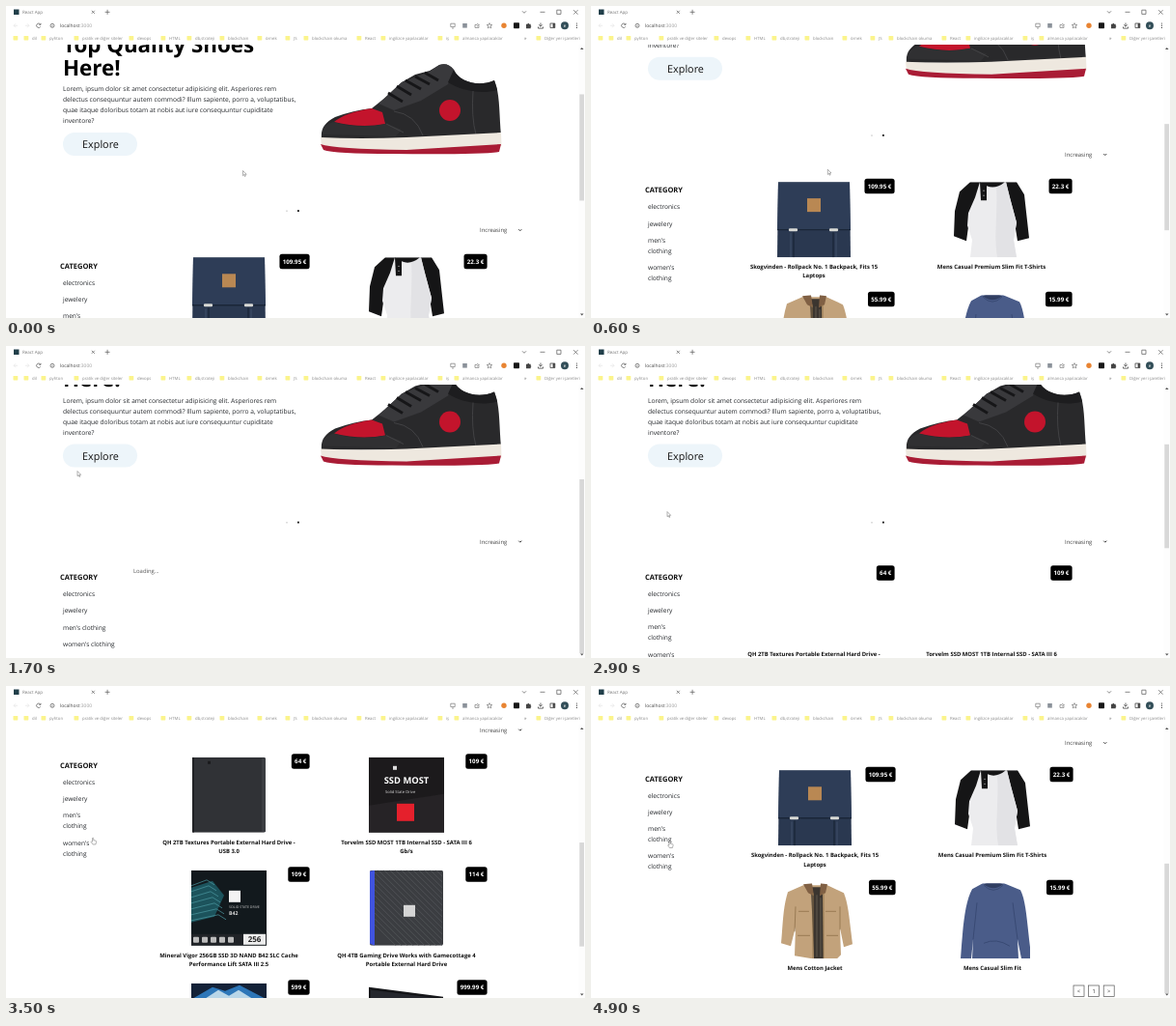
An HTML page that plays this animation: 600x323 px, repeating every 5 s.

```html
<!DOCTYPE html>
<html lang="en">
<head>
<meta charset="utf-8">
<title>Shop</title>
<style>
  html, body { margin: 0; height: 100%; overflow: hidden; background: #fff; }
  #stage { display: block; width: 100vw; height: 100vh; }
  text { font-family: "Open Sans", "Noto Sans", sans-serif; text-rendering: geometricPrecision; }
  .b { font-weight: 700; }
  .m { text-anchor: middle; }
  .line { fill: none; stroke: #555; stroke-width: .7; }
</style>
</head>
<body>
<svg id="stage" viewBox="0 0 600 323"></svg>
<script>
const text = (x, y, size, str, fill = '#25282c', cls = '') =>
  `<text x="${x}" y="${y}" font-size="${size}" fill="${fill}" class="${cls}">${str}</text>`;
const rect = (x, y, w, h, fill, rx = 0) =>
  `<rect x="${x}" y="${y}" width="${w}" height="${h}" fill="${fill}" rx="${rx}"/>`;
const path = (d, fill) => `<path d="${d}" fill="${fill}"/>`;
const line = (d, stroke = '#555', w = .7) =>
  `<path d="${d}" fill="none" stroke="${stroke}" stroke-width="${w}"/>`;
const dot = (x, y, r, fill) => `<circle cx="${x}" cy="${y}" r="${r}" fill="${fill}"/>`;
const range = n => [...Array(n).keys()];

// Product pictures, each drawn in a 78 x 78 box
const pics = {
  pack: path('M2 0H76L77 78H1Z', '#2a3850') + path('M2 0H76L77 49H1Z', '#2e3d57') +
    line('M1 49.5H77M18 52V78M59 52V78', '#1a2638', 1.4) + line('M15 53V78M62 53V78', '#46566f', .8) +
    rect(32, 17, 14, 14, '#b98853') + rect(13, 48, 9, 3, '#d8d9d5', 1) + rect(55, 48, 9, 3, '#d8d9d5', 1),
  tee: path('M17 0L6 10 1 30 0 56 13 61 17 32 23 16 28 0ZM53 0H65L73 13 78 58 66 61 62 36 57 16Z', '#151516') +
    path('M27 0L22 16 15 32 14 45 19 60 17 78H65L62 60 65 42 58 16 54 0Z', '#ececee') +
    path('M44 4C46 30 41 55 45 78H65L62 60 65 42 58 16 54 0Z', '#e2e2e5') +
    path('M27 0H53Q43 8 34 4V19H28Z', '#151516') + dot(31, 9, .6, '#ccc') + dot(31, 14, .6, '#ccc'),
  jacket: path('M27 2L11 9C6 25 6 40 4 62L14 65 19 45 18 75 36 78H62L66 74 65 46 69 66 78 63C75 40 74 22 69 10L52 2Z', '#c2a27b') +
    path('M35 4H47L48 78H38Z', '#3b352f') + path('M27 1L36 0 38 13 32 10ZM52 1L45 0 44 13 50 10Z', '#806044') +
    line('M19 24L18 50M65 24V48M22 29h11M50 29h11M21 54h13M51 54h12M37 10V78M48 10V78', '#957650', .9) +
    line('M41 12V76M45 15V76', '#756a5d', .7),
  sweater: path('M29 0L18 6C10 20 8 50 6 78H17L19 58 18 78H66L65 58 69 78H78V66C75 43 74 18 68 7L51 0Z', '#4a5c89') +
    path('M30 1Q40 9 50 1L47 0H33Z', '#303e62') +
    line('M19 58L23 20M65 58L60 20M30 62Q43 56 57 65M30 2Q40 12 50 2', '#394a74', 1),
  drive: rect(1, 0, 76, 78, '#303236', 2) + rect(1, 0, 2, 78, '#202124') + rect(73, 1, 4, 76, '#3c3e42') +
    rect(17, 4, 3, 3, '#1a1b1d'),
  ssd: rect(0, 0, 78, 78, '#1c1a1c') + path('M0 50L78 38V78H0Z', '#262326') + rect(25, 9, 4, 4, '#ddd') +
    text(39, 27, 9.4, 'SSD MOST', '#fff', 'b m') + text(17, 37, 4.1, 'Solid State Drive', '#ddd') +
    rect(29, 48, 18, 18, '#e5202c'),
  chip: rect(0, 0, 78, 78, '#12191d') + path('M0 18L22 11 34 26 24 48 0 54Z', '#1c535c') +
    line(range(7).map(i => `M0 ${16 + i * 6}L${16 + i * 2} ${10 + i * 6}l8 5`).join(''), '#4d9aa3', .7) +
    rect(39, 21, 12, 12, '#f3f3f3') + text(39, 39, 3.6, 'SOLID STATE DRIVE', '#ccc') +
    text(39, 46, 5.2, 'B42', '#ddd', 'b') + rect(0, 66, 78, 12, '#202327') +
    range(5).map(i => rect(2 + i * 9, 69, 6, 6, '#bbb', 1)).join('') + rect(54, 66, 23, 11, '#eee') +
    text(65.5, 74.5, 8, '256', '#222', 'b m'),
  game: rect(1, 0, 76, 78, '#3b3d41', 2) +
    line(range(21).map(i => `M6 ${i * 6 - 64}l70 70`).join(''), '#54565a', .8) +
    path('M1 1L6 0V78L1 76Z', '#4053de') + rect(36, 36, 12, 12, '#d5d5d5'),
  screen: rect(0, 0, 78, 44, '#142238') + path('M3 15L22 4 35 8 50 2 75 15V42H3Z', '#2d76b8') +
    path('M8 20L28 7 39 13 49 7 70 20Z', '#b9d6e8'),
  wide: path('M0 4L77 14V42L0 36Z', '#151619') + path('M2 7L75 16V38L2 32Z', '#25272d')
};

const clothes = [
  ['pack', '109.95 €', 'Skogvinden - Rollpack No. 1 Backpack, Fits 15', 'Laptops'],
  ['tee', '22.3 €', 'Mens Casual Premium Slim Fit T-Shirts'],
  ['jacket', '55.99 €', 'Mens Cotton Jacket'],
  ['sweater', '15.99 €', 'Mens Casual Slim Fit']
];
const gadgets = [
  ['drive', '64 €', 'QH 2TB Textures Portable External Hard Drive -', 'USB 3.0'],
  ['ssd', '109 €', 'Torvelm SSD MOST 1TB Internal SSD - SATA III 6', 'Gb/s'],
  ['chip', '109 €', 'Mineral Vigor 256GB SSD 3D NAND B42 SLC Cache', 'Performance Lift SATA III 2.5'],
  ['game', '114 €', 'QH 4TB Gaming Drive Works with Gamecottage 4', 'Portable External Hard Drive'],
  ['screen', '599 €', ''],
  ['wide', '999.99 €', '']
];

function card([pic, price, ...title], i) {
  const cx = i % 2 ? 415 : 231, top = 260.3 + 117 * (i >> 1), right = cx + 83.6;
  const w = 4.6 + 3.54 * price.length - (price.includes('.') ? 1.77 : 0);
  return `<svg class="pic" x="${cx - 39}" y="${top}" width="78" height="78">${pics[pic]}</svg>` +
    rect(right - w, top - 3.5, w, 15.5, '#000', 2.5) +
    text(right - w / 2, top + 6.6, 6.2, price, '#fff', 'b m') +
    title.map((s, n) => text(cx, top + 89.8 + n * 9.5, 5.9, s, '#111', 'b m')).join('');
}

const shoe =
  path('M327 137C326 127 330 121 341 115Q360 108 379 106L393 95 410 79 424 71 439 67 449 61Q458 58 464 66C470 79 490 84 506 77 512 90 511 112 513 134L420 137Z', '#29292b') +
  path('M340 120Q352 110 379 106L390 110 393 122Q368 127 340 120Z', '#c3142c') +
  path('M328 133Q327 124 339 120 366 128 394 122L410 128 404 135Z', '#303032') +
  path('M386 101L410 79 439 68 449 61Q458 58 464 66L458 81 430 98 402 108Z', '#39393c') +
  path('M464 66C470 79 490 84 506 77L509 87C492 92 470 87 458 79Z', '#1d1d1f') +
  line('M396 90l15 9M405 83l15 9M414 77l16 9M424 73l15 8M434 69l14 8', '#161618', 3) +
  line('M402 109Q424 112 432 134M484 88Q482 115 487 133M394 122L412 131', '#48484b', .8) +
  dot(460, 108, 11, '#c3142c') +
  path('M326 136Q366 138 415 136L513 131 513.5 145Q490 149 400 149 340 149 327 145Z', '#eee8df') +
  path('M326 143Q340 148 415 149L513 143 511 151Q490 154 400 153 340 153 329 149Z', '#a91c35');

const intro = [
  'Lorem, ipsum dolor sit amet consectetur adipisicing elit. Asperiores rem',
  'delectus consequuntur autem commodi? Illum sapiente, porro a, voluptatibus,',
  'quae itaque doloribus totam at nobis aut iure consequuntur cupiditate',
  'inventore?'
];
const link = (y, str) => text(59, y, 6.6, str);
const pager = ['&lt;', '1', '&gt;'].map((s, i) =>
  `<rect x="${499 + i * 15.6}" y="483" width="11" height="11.5" class="line"/>` +
  text(504.5 + i * 15.6, 491, 5.8, s, '#333', 'm')).join('');

const page = text(59, 48.3, 22.35, 'Top Quality Shoes', '#000', 'b') + text(59, 71.5, 22.35, 'Here!', '#000', 'b') +
  intro.map((s, i) => text(59, 88.4 + i * 10.9, 6.64, s)).join('') +
  rect(59, 131, 77, 24, '#edf5fa', 12) + text(98, 147.4, 10.8, 'Explore', '#111', 'm') + shoe +
  rect(290, 211.5, 2, 1.5, '#ddd') + rect(302, 211.2, 1.8, 1.8, '#111') +
  text(491, 234.2, 5.95, 'Increasing', '#444') + line('M531.3 231.2l1.5 1.5 1.5-1.5', '#222', .9) +
  text(56, 271.6, 7.5, 'CATEGORY', '#111', 'b') + link(288.6, 'electronics') + link(305.7, 'jewelery') +
  `<g id="narrow">${link(322.8, "men's") + link(333.8, 'clothing') + link(351, "women's") + link(362.2, 'clothing')}</g>
   <g id="loading">${link(323.2, "men's clothing") + link(340.4, "women's clothing") + text(132, 264.2, 5.9, 'Loading...', '#555')}</g>
   <g id="clothes">${clothes.map(card).join('')}${pager}</g>
   <g id="gadgets">${gadgets.map(card).join('')}</g>`;

const bookmarks = [
  [21, 'dil'], [39, 'pyhton'], [73, 'pratik ve diğer siteler'], [130, 'devops'], [163, 'HTML'],
  [190, 'db,strateji'], [224, 'blockchain'], [263, 'örnek'], [292, 'JS'], [311, 'blockchain okuma'],
  [366, 'React'], [391, 'ingilizce yapılacaklar'], [450, 'iş'], [467, 'almanca yapılacaklar'],
  [552, 'Diğer yer işaretleri']
];
const folder = x => rect(x - 2.5, 31, 4.8, 4.4, '#fbf48c', .6);
const chrome = rect(0, 0, 600, 40, '#fff') +
  rect(8, 3.5, 5.5, 5.5, '#213f4a') + text(17, 8.1, 4.5, 'React App', '#777') +
  line('M88.8 4.8l3 3m0-3l-3 3M102.6 6.3h5M105.1 3.8v5M535 5.3l2 2 2-2M553.5 6.3h5M570.8 4.2h4.2v4.2h-4.2zM588.2 4.2l4.4 4.4m0-4.4l-4.4 4.4') +
  line('M12 20.3H8m2-2l-2 2 2 2M20 20.3h4m-2-2l2 2-2 2', '#e4e4e4') +
  line('M35.6 19A2.2 2.2 0 1 0 35.7 21.4M36 17.8v1.6h-1.7') +
  `<circle cx="48" cy="20.3" r="2" class="line"/>` + line('M48 20v1.3') +
  `<text x="56" y="22.2" font-size="4.9" fill="#444">localhost<tspan fill="#999">:3000</tspan></text>` +
  line('M460.8 18.2h4.4v3.4h-4.4zM462 23h2M486 22.4v-3h2m-2 3h4v-1.5m-2-2.5l2.5 1.3-2.5 1.3M501 17.6l.8 1.9 2 .1-1.6 1.3.6 2-1.8-1.1-1.8 1.1.6-2-1.6-1.3 2-.1z', '#777') +
  rect(473.2, 18, 4.6, 4.6, '#8a9199') + dot(516, 20.3, 2.7, '#e88432') + rect(526, 17.3, 6, 6, '#161616', .7) +
  path('M539 18.7h1.4q.9-2 1.8 0h1.5v1.5q1.6.8 0 1.7v1.4H539z', '#444') +
  line('M554 17.5v3.7m-1.8-1.8l1.8 1.8 1.8-1.8M551.5 21.5v1.6h5v-1.6M564 18h4.8v4.6H564z', '#444', .8) +
  rect(566.6, 18, 2.2, 4.6, '#444') + dot(579, 20.3, 4, '#324e58') + text(579, 21.9, 4.5, 'e', '#fff', 'm') +
  [18, 20.2, 22.4].map(y => dot(591.5, y, .6, '#444')).join('') +
  folder(10) + bookmarks.map(([x, s]) => folder(x) + text(x + 6, 34.8, 4.3, s, '#8a8a8a')).join('') +
  text(537, 34.8, 5, '»', '#666');

const stage = document.getElementById('stage');
stage.innerHTML = rect(0, 0, 600, 323, '#fff') + `<g id="page">${page}</g>` + chrome +
  rect(593.5, 40, 6.5, 283, '#fdfdfd') + path('M595 45l1.8-2 1.8 2zM595 318.5l1.8 2 1.8-2z', '#555') +
  `<rect id="thumb" x="594.3" width="4.7" fill="#d8d8d8"/>
   <g id="cursor" fill="#fff" stroke="#666" stroke-width=".5">
     <path id="arrow" d="M0 0V5.2L1.2 4.1 2 6 2.8 5.6 2 3.8H3.7Z"/>
     <path id="hand" d="M0 .5Q.6-.4 1.2 .5V2.6L3.6 3.2Q4.3 3.5 4 4.8L3.4 7H.5L-1.4 4.4Q-1.2 3.5 0 4.2Z"/>
   </g>`;
const el = id => document.getElementById(id);
const show = (id, on) => el(id).setAttribute('display', on ? 'inline' : 'none');

// Linear interpolation through [time, ...values] keys
function along(keys, t, k = 1) {
  const i = keys.findIndex(p => p[0] > t);
  if (i < 0) return keys[keys.length - 1][k];
  const a = keys[i - 1], b = keys[i];
  return a[k] + (b[k] - a[k]) * (t - a[0]) / (b[0] - a[0]);
}
const scrollKeys = [[0, 0], [400, 47], [1000, 140.5], [1499, 140.5], [1500, 29.5], [3000, 29.5],
  [3500, 186.5], [3799, 186.5], [3800, 29.5], [4400, 29.5], [4800, 173]];
const mouseKeys = [[0, 245.5, 170.5], [600, 245.3, 169.2], [1000, 241.5, 166], [1400, 74, 144],
  [1700, 74, 129.5], [2400, 74, 129.5], [2900, 79, 171.5], [3500, 89.5, 157], [3800, 82, 142],
  [4800, 82, 161], [4900, 81, 160.5]];
const heights = { all: 687, loading: 420, gadgets: 703, clothes: 563.5 };

function draw(t) {
  const view = t < 1500 ? 'all' : t < 2500 ? 'loading' : t < 3800 ? 'gadgets' : t < 4300 ? 'loading' : 'clothes';
  const scroll = along(scrollKeys, t), track = 270 / heights[view];
  el('page').setAttribute('transform', `translate(0 ${-scroll})`);
  el('thumb').setAttribute('y', 48 + (scroll + 110.5) * track);
  el('thumb').setAttribute('height', 280 * track);
  show('loading', view === 'loading');
  show('narrow', view !== 'loading');
  show('gadgets', view === 'gadgets');
  show('clothes', view === 'all' || view === 'clothes');
  el('clothes').setAttribute('transform', `translate(${view === 'clothes' ? 1 : 0} 0)`);
  for (const p of el('gadgets').querySelectorAll('.pic')) p.setAttribute('display', t < 3000 ? 'none' : 'inline');
  const hand = t >= 700 && t < 1500 || t >= 3300 && t < 3800 || t >= 4600;
  show('hand', hand);
  show('arrow', !hand);
  el('cursor').setAttribute('transform', `translate(${along(mouseKeys, t)} ${along(mouseKeys, t, 2)})`);
}

const start = performance.now();
function tick() {
  draw(Math.floor((performance.now() - start) % 5000 / 100) * 100);
  requestAnimationFrame(tick);
}
tick();
</script>
</body>
</html>
```
